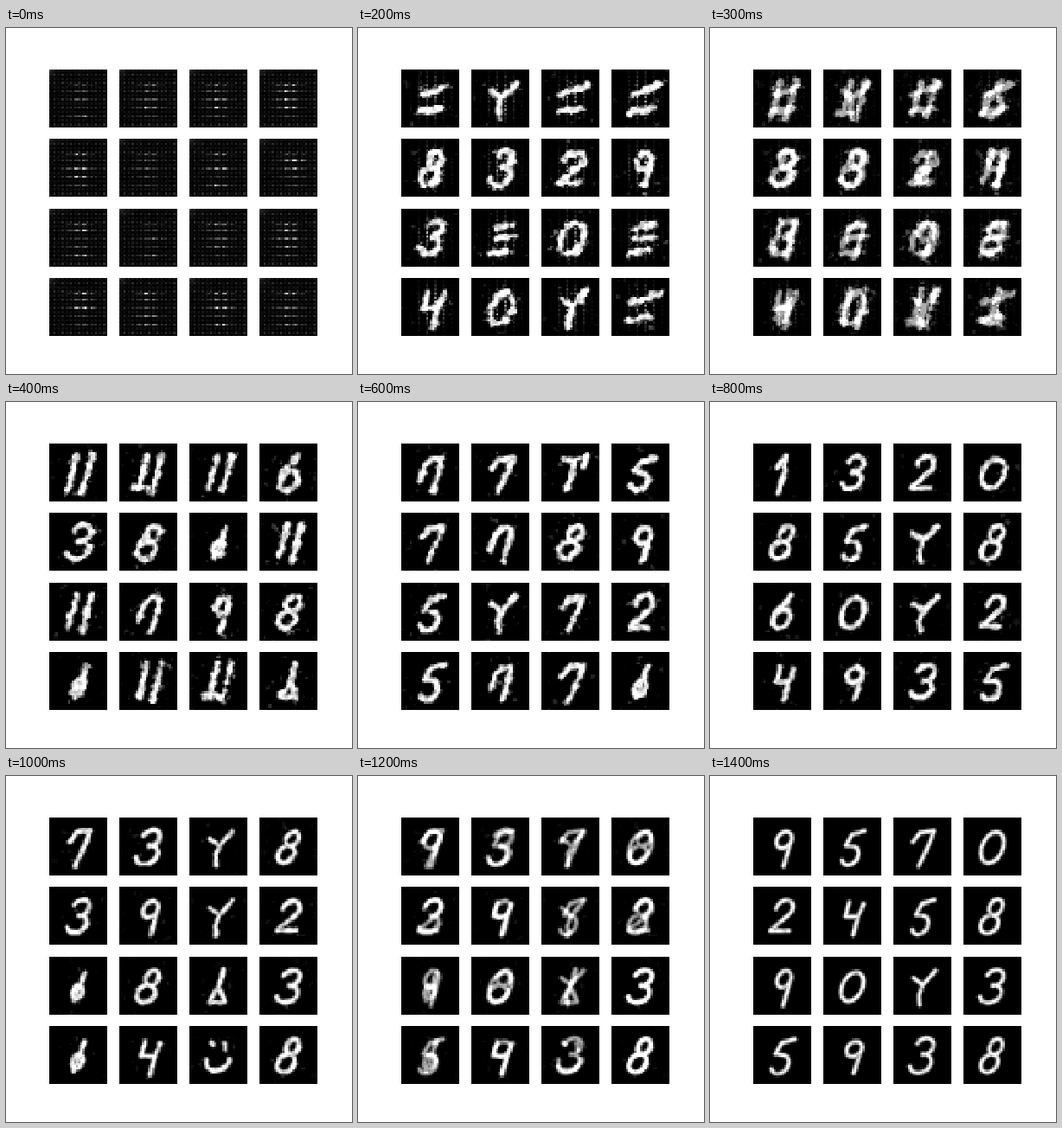
Recreate the animation shown at these times as a matplotlib script. Size 400x400 px, loop 1.5 s.

```python
import numpy as np
import matplotlib.pyplot as plt
from matplotlib.animation import FuncAnimation

N = 28            # cells along each side of a tile
FRAMES = 15
rows, cols = np.mgrid[:N, :N]
cy, cx = rows + 0.5, cols + 0.5
rng = np.random.default_rng(7)


def line(*xy):
    return np.array(xy, float).reshape(-1, 2)


def arc(x, y, rx, ry, start=0, end=360):
    a = np.radians(np.linspace(start, end, 17))
    return np.column_stack([x + rx * np.cos(a), y + ry * np.sin(a)])


# Strokes in a box from -1 to 1, y downwards
SLASHES = [line(-.6, -1, -.6, .8), line(.6, -1, .6, 1)]
GLYPHS = {
    "0": [arc(0, 0, .95, .85)],
    "1": [line(-.6, -.3, -.1, -.9, .1, 0, 0, 1)],
    "2": [arc(0, -.45, .7, .5, 180, 400), line(.5, -.1, -.7, .8, .9, .8)],
    "3": [arc(0, -.5, .7, .45, 200, 450), arc(0, .4, .85, .5, -90, 160)],
    "4": [line(-.6, -.8, -.6, 0, .5, 0), line(.7, -.7, .5, 0, .5, 1)],
    "5": [line(.7, -.9, -.3, -.7, -.6, -.1, 0, -.05), arc(0, .45, .7, .5, -90, 150)],
    "6": [line(.3, -1, -.5, -.1), arc(0, .35, .7, .55)],
    "7": [line(-.9, -.3, -.5, -.8, .6, -.9, .5, -.2, .1, 1)],
    "8": [arc(.1, -.5, .55, .42), arc(-.1, .4, .75, .48)],
    "9": [arc(0, -.4, .6, .45), line(.6, -.5, .5, 1)],
    "=": [line(-1, -.3, 0, -.5, 1, -.8), line(-.8, .7, 1, .5)],
    "E": [line(-.8, -.6, .7, -.8), line(-.5, 0, .9, -.1), line(-.7, .8, .7, .6)],
    "H": SLASHES,
    "U": SLASHES + [line(-1, .7, 0, .7, .6, 1)],
    "n": [line(-.8, .4, -.7, -.4, -.2, -.8, .5, -.8, .6, 0, .5, 1)],
    "T": [line(-1, -.8, .3, -.8), line(0, -.8, 0, .9), line(.9, -1, .9, -.4)],
    "x": [line(-1, -.5, 0, -.1, .8, -.9), line(0, -.1, -.1, .5, .2, 1)],
    "v": [arc(0, .2, 1, .6, 0, 180), line(-.9, -.7, -.7, -.6), line(.2, -.7, .4, -.4)],
    "A": [line(0, -1, 0, 0, -.5, .9, .9, .9, 0, 0)],
    "*": [arc(0, .3, .4, .4), line(.2, -.8, .1, -.2, -.1, .8)],
}

# What the sixteen samples resemble as training goes on
SAMPLES = {
    2: "=x== 8329 3E0E 40x=",
    4: "HUH6 38*H Hn98 *HUA",
    6: "n7T5 7n89 5x72 5n7*",
    8: "1320 85x8 60x2 4935",
    10: "73x8 39x2 *8A3 *4v8",
    14: "9570 2458 90x3 5938",
}


def smooth_noise():
    a = rng.normal(size=(N, N))
    for axis in (0, 1):
        a = (np.roll(a, 1, axis) + 2 * a + np.roll(a, -1, axis)) / 4
    return a / a.std()


def stroke_distance(p):
    best = np.full((N, N), 99.0)
    for (ax, ay), (bx, by) in zip(p[:-1], p[1:]):
        dx, dy = bx - ax, by - ay
        t = np.clip(((cx - ax) * dx + (cy - ay) * dy) / (dx * dx + dy * dy), 0, 1)
        best = np.minimum(best, np.hypot(cx - ax - t * dx, cy - ay - t * dy))
    return best


def draw_sample(name, step):
    """A slanted glyph whose pen gets thinner and cleaner with training."""
    raw = 1 - step / (FRAMES - 1)
    width, height = (5.8, 8.8) * rng.uniform(0.93, 1.05, 2)
    slant = 2.3

    def place(p):
        x, y = p.T
        return np.column_stack([14 + raw + width * x - slant * y, 14.5 + height * y])

    near = np.min([stroke_distance(place(p)) for p in GLYPHS[name]], axis=0)
    pen = 1.0 + 0.6 * raw + 0.6 * raw * smooth_noise()
    image = np.clip((pen - near) / 1.3 + 0.5, 0, 1)
    image *= 1 - 0.12 * np.clip(smooth_noise(), 0, 2)
    specks = np.clip(smooth_noise() - 1.7, 0, 1) * np.exp(-near / 5)
    image = np.maximum(image, raw * specks)
    if step == 2:
        # lattice left by the strided layers
        mid = np.exp(-((cx - 15) / 6) ** 2 - ((cy - 14) / 9) ** 2)
        stripes = (cols % 4 == 0) * (0.4 + 0.6 * (rows % 2)) * mid
        image = np.maximum(image, stripes * rng.uniform(0.2, 0.9, (N, N)))
    return np.clip(image, 0, 1)


def draw_untrained():
    """Dim lattice with broken bright rows near the middle."""
    mid = np.exp(-((np.arange(N) - rng.uniform(13, 16)) / 5) ** 2)
    dash = np.where(np.arange(N) % 4 < 2, 1, 0.25)
    image = 0.04 * rng.random((N, N))
    image += 0.1 * (rows % 4 == 2) * (cols % 4 == 2)
    image += 0.06 * (rows % 2 == 0) * (cols % 2 == 0)
    for r in (7, 10, 14, 18, 22):
        image[r] += rng.uniform(0.2, 1.0) * dash * mid * rng.uniform(0.4, 1.1, N)
    image += 0.16 * np.exp(-(rows + cols) / 2.5)
    return np.clip(image, 0, 1)


keys = {0: np.array([draw_untrained() for _ in range(16)])}
for step, names in SAMPLES.items():
    keys[step] = np.array([draw_sample(c, step) for c in names.replace(" ", "")])
steps = sorted(keys)


def tiles_at(frame):
    if frame in keys:
        return keys[frame]
    before = max(s for s in steps if s < frame)
    after = min(s for s in steps if s > frame)
    t = (frame - before) / (after - before)
    return np.clip(1.35 * ((1 - t) * keys[before] + t * keys[after]), 0, 1)


fig, axes = plt.subplots(4, 4, figsize=(4, 4), dpi=100)
fig.subplots_adjust(left=0.125, right=0.9, bottom=0.11, top=0.88, wspace=0.2, hspace=0.2)
pictures = []
for ax, tile in zip(axes.flat, tiles_at(0)):
    ax.axis("off")
    pictures.append(ax.imshow(tile, cmap="gray", vmin=0, vmax=1, interpolation="nearest"))


def update(frame):
    for picture, tile in zip(pictures, tiles_at(frame)):
        picture.set_data(tile)
    return pictures


anim = FuncAnimation(fig, update, frames=FRAMES, interval=100, repeat=True)
plt.show()
```
